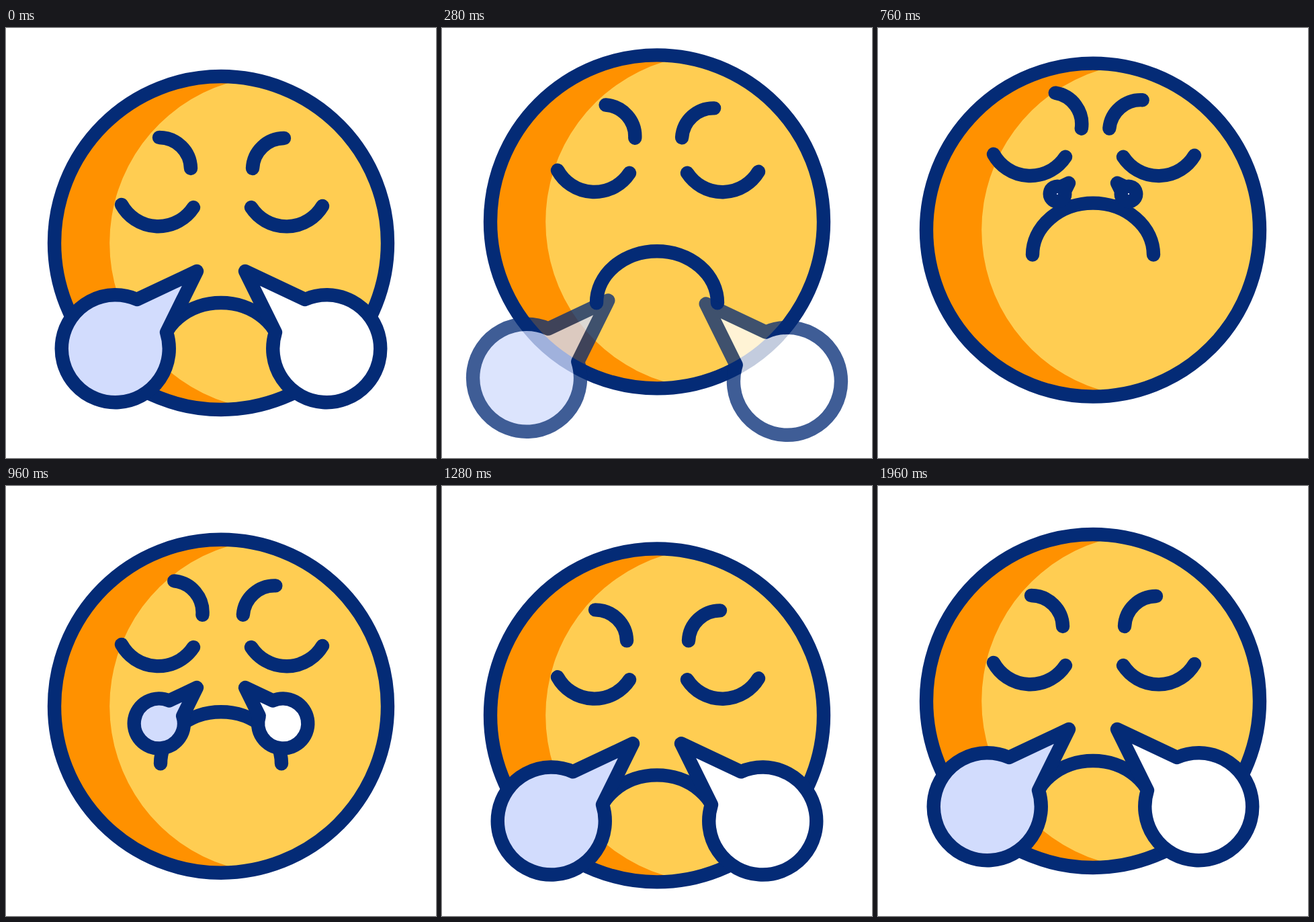
An HTML page that plays this animation: 640x640 px, repeating every 2 s.

```html
<!DOCTYPE html>
<html lang="en">
<head>
<meta charset="utf-8">
<title>Huffing face</title>
<style>
  html, body { margin: 0; width: 100%; height: 100%; overflow: hidden; background: #fff; }
  svg { display: block; width: 100%; height: 100%; }
  .line { fill: none; stroke: #042b76; stroke-width: 20.4; stroke-linecap: round; stroke-linejoin: round; }
  .puff { vector-effect: non-scaling-stroke; }
</style>
</head>
<body>
<svg viewBox="0 0 640 640">
  <g id="head">
    <circle cx="320" cy="320" r="248" fill="#ffcd52"/>
    <path d="M330 82A249 249 0 0 0 330 558L320 568A248 248 0 0 1 320 72Z" fill="#ff9100"/>
    <circle class="line" cx="320" cy="320" r="248"/>
    <path id="browL" class="line" d="M228 163A47 47 0 0 1 275 209"/>
    <path id="browR" class="line" d="M414 164A47 47 0 0 0 367 209"/>
    <path id="eyes" class="line" d="M172 263A62.5 62.5 0 0 0 279 267M365 267A62.5 62.5 0 0 0 471 265"/>
    <path id="mouth" class="line" d="M230 486A90 77 0 0 1 410 486"/>
  </g>
  <!-- Puffs are drawn around their tips, so scaling grows them out of the nose. -->
  <path id="puffL" class="line puff" style="fill:#d2dcfd" d="M0 0L-89 42A80 80 0 1 0 -45 91Z"/>
  <path id="puffR" class="line puff" style="fill:#fff" d="M0 0L89 42A80 80 0 1 1 45 91Z"/>
</svg>
<script>
const LOOP = 2000, STEP = 40;
const BLOWN = 430, PEAK = 560, SETTLED = 1280;
const el = id => document.getElementById(id);
const move = (id, transform) => el(id).setAttribute('transform', transform);

const span = (t, from, to) => Math.min(1, Math.max(0, (t - from) / (to - from)));
const ease = (t, from, to) => {
  const u = span(t, from, to);
  return u * u * (3 - 2 * u);
};

// Head: up, down past rest, back to rest.
const headY = t => -44 * ease(t, 0, BLOWN) + 66 * ease(t, 470, 1170) - 22 * ease(t, 1200, 1967);

// Features tilt up, then come down with a soft start and a firm stop.
function tilt(t, start) {
  if (t < PEAK) return ease(t, start, PEAK);
  const u = span(t, PEAK, SETTLED);
  return 1 - u * u * (2.13 - 1.13 * u);
}

function placePuff(id, x, y, scale, opacity) {
  move(id, `translate(${x} ${y}) scale(${scale})`);
  el(id).setAttribute('opacity', opacity);
}

function draw(t) {
  const y = headY(t), up = tilt(t, 120), turn = tilt(t, 80);
  move('head', `translate(0 ${y})`);
  move('browL', `translate(${37 * turn} ${-50.5 * up}) rotate(${10.8 * turn} 251.5 186)`);
  move('browR', `translate(${-25 * turn} ${-45 * up}) rotate(${3.6 * turn} 390.5 186.5)`);
  move('eyes', `translate(0 ${-65 * up})`);
  move('mouth', `translate(0 ${-150 * up})`);

  if (t < PEAK) {
    const out = ease(t, 0, BLOWN), opacity = 1 - ease(t, 210, BLOWN);
    placePuff('puffL', 284 - 51 * out, 362 + 60.5 * out, 1, opacity);
    placePuff('puffR', 356 + 51 * out, 362 + 67.5 * out, 1, opacity);
  } else {
    const scale = 1 - up, tipY = 362 + y - 130 * up, opacity = scale > 0.01 ? 1 : 0;
    placePuff('puffL', 284, tipY, Math.max(scale, 0.01), opacity);
    placePuff('puffR', 356, tipY, Math.max(scale, 0.01), opacity);
  }
}

const start = performance.now();
function tick() {
  const t = (performance.now() - start) % LOOP;
  draw(Math.floor(t / STEP) * STEP);
  requestAnimationFrame(tick);
}
tick();
</script>
</body>
</html>
```
